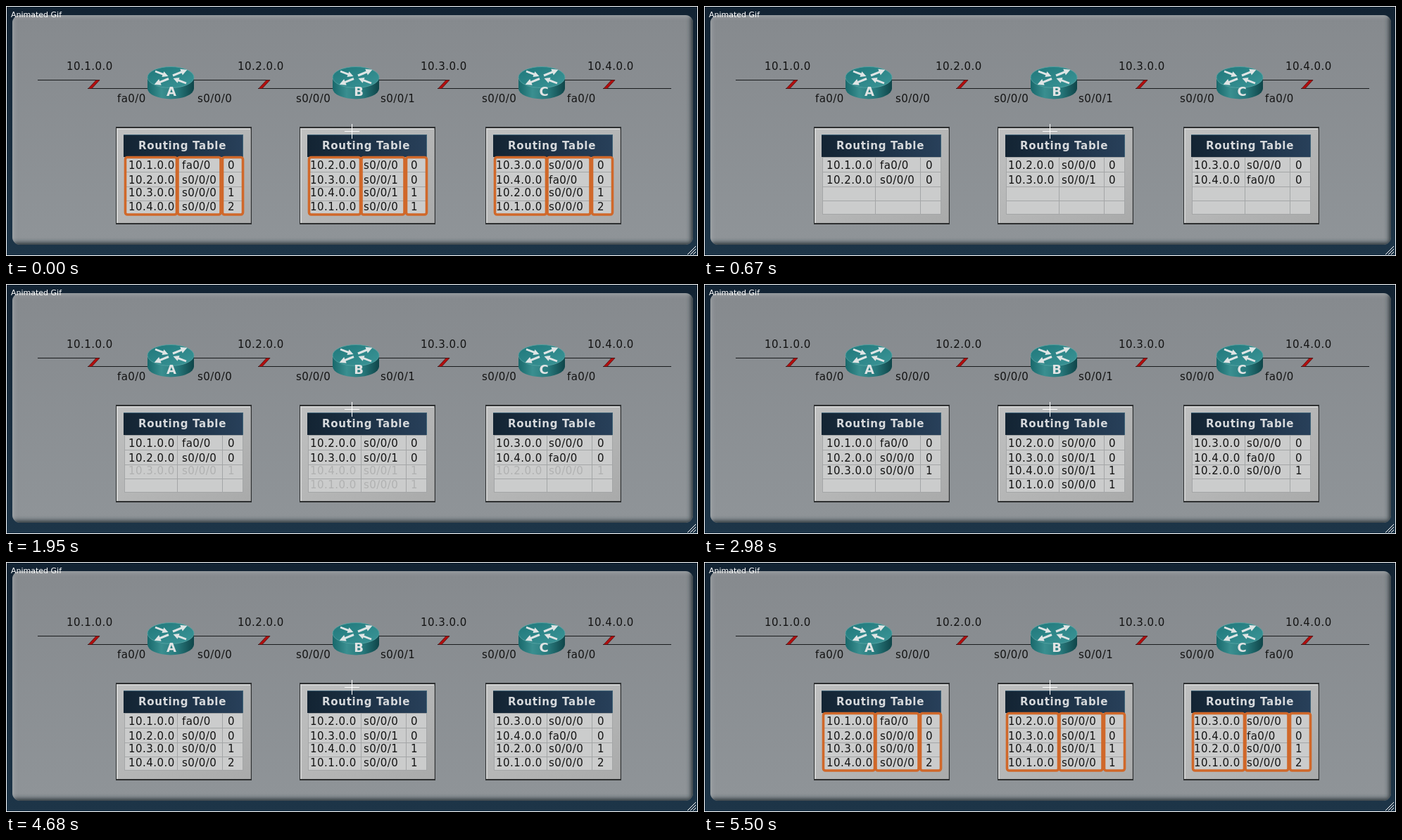
These frames come from a looping animation (983x356 px, 6320 ms). An HTML page:

```html
<!DOCTYPE html>
<html lang="en">
<head>
<meta charset="utf-8">
<title>Routing tables</title>
<style>
html, body { margin: 0; width: 100%; height: 100%; overflow: hidden; background: #fff; }
svg { display: block; }
text { font: 15px "DejaVu Sans", Verdana, sans-serif; letter-spacing: .45px; fill: #141414; white-space: pre; }
.title { font-weight: bold; letter-spacing: .7px; fill: #d6d9dc; }
.name { font-size: 18px; font-weight: bold; letter-spacing: 0; fill: #e2e4e4; text-anchor: middle; }
.caption { font-size: 11px; letter-spacing: 0; fill: #fff; }
.wire { stroke: #191b1d; fill: none; }
</style>
</head>
<body>
<svg id="stage" width="983" height="356" viewBox="0 0 983 356">
<defs>
  <linearGradient id="back" x2="0" y2="1"><stop stop-color="#122333"/><stop offset="1" stop-color="#1d3548"/></linearGradient>
  <linearGradient id="panel" x2="0" y2="1"><stop stop-color="#868a8e"/><stop offset="1" stop-color="#8f9498"/></linearGradient>
  <linearGradient id="frame" x2="1" y2="1"><stop stop-color="#bfc0c0"/><stop offset=".5" stop-color="#b5b6b6"/><stop offset="1" stop-color="#a9aaaa"/></linearGradient>
  <linearGradient id="head" x2="1"><stop stop-color="#132433"/><stop offset="1" stop-color="#28405a"/></linearGradient>
  <linearGradient id="side"><stop stop-color="#18686b"/><stop offset=".3" stop-color="#3a8f90"/><stop offset=".65" stop-color="#27787b"/><stop offset="1" stop-color="#0f4549"/></linearGradient>
  <linearGradient id="top" x2="1" y2="1"><stop stop-color="#1f777a"/><stop offset="1" stop-color="#3c9698"/></linearGradient>
  <filter id="soft"><feGaussianBlur stdDeviation="3"/></filter>
  <clipPath id="inside"><rect x="9" y="13" width="967" height="327" rx="11"/></clipPath>
  <g id="arrow"><path d="M0-1.6H13V-4.6L22 0 13 4.6V1.6H0Z" fill="#dfe5e5"/></g>
  <g id="router">
    <path d="M-33 0V16A33 15 0 0 0 33 16V0Z" fill="url(#side)"/>
    <ellipse rx="33" ry="15" fill="url(#top)" stroke="#5aa6a6" stroke-width=".8"/>
    <use href="#arrow" transform="translate(3 -2.5) rotate(-22)"/>
    <use href="#arrow" transform="translate(-3 2) rotate(158)"/>
    <use href="#arrow" transform="translate(-22 -8.5) rotate(21) scale(.9)"/>
    <use href="#arrow" transform="translate(22 8.5) rotate(201) scale(.9)"/>
  </g>
  <g id="table">
    <rect width="193" height="139" fill="#2d2f30"/>
    <rect x="1" y="2" width="190.5" height="135" fill="#d0d1d1"/>
    <rect x="3" y="4" width="188.5" height="133" fill="url(#frame)"/>
    <rect x="11" y="11" width="170" height="32" fill="url(#head)"/>
    <path d="M11 11.5H181M180.5 11V43" stroke="#3f6378" fill="none"/>
    <rect x="12" y="43" width="169" height="82" fill="#cbcccc"/>
    <path d="M12 43.5H181M12 64.5H181M12 85.5H181M12 105.5H181M12 124.5H181M87.5 43V125M151.5 43V125M180.5 43V125M12.5 43V125" stroke="#a4a6a7" fill="none"/>
    <text class="title" x="32" y="32">Routing Table</text>
  </g>
  <g id="marks" fill="none" stroke="#d0682a" stroke-width="3.6">
    <rect x="13.5" y="43.5" width="73" height="81.5" rx="3"/>
    <rect x="88" y="43.5" width="61" height="81.5" rx="3"/>
    <rect x="151.5" y="43.5" width="29" height="81.5" rx="3"/>
  </g>
</defs>
<rect x="1" y="1" width="981" height="354" fill="url(#back)"/>
<g clip-path="url(#inside)">
  <rect x="9" y="13" width="967" height="327" fill="url(#panel)"/>
  <path d="M978 10V342H6" fill="none" stroke="#2b343b" stroke-width="10" filter="url(#soft)"/>
  <path d="M8 342V12H978" fill="none" stroke="#a9adb0" stroke-width="4" filter="url(#soft)"/>
</g>
<g id="scene"></g>
<path d="M481 178.5H502M491.5 168V189M968 354 980 342M972 354 980 346M976 354 980 350" stroke="#fff" fill="none"/>
<text class="caption" x="7" y="16">Animated Gif</text>
</svg>
<script>
const LOOP = 6320;
const scene = document.getElementById("scene");

function add(tag, attrs, parent = scene, text = "") {
  const el = document.createElementNS("http://www.w3.org/2000/svg", tag);
  for (const key in attrs) el.setAttribute(key, attrs[key]);
  el.textContent = text;
  parent.appendChild(el);
  return el;
}
const write = (x, y, text, parent, cls = "") => add("text", { x, y, class: cls }, parent, text);

// Links: start of upper wire, left end of bolt, end of lower wire
[[45, 116, 203], [266, 358, 466], [529, 613, 730], [792, 848, 945]].forEach(([from, bolt, to]) => {
  add("path", { d: `M${from} 105.5H${bolt + 17}M${bolt} 117.5H${to}`, class: "wire" });
  add("path", { d: `M${bolt + 1} 117.5 ${bolt + 12} 105.5H${bolt + 17}L${bolt + 6} 117.5Z`,
    fill: "#b10e0e", stroke: "#4a1010", "stroke-width": .7 });
});
[[234, "A", 235], [497, "B", 501], [761, "C", 764]].forEach(([x, name, nameX]) => {
  add("use", { href: "#router", x, y: 101.5 });
  write(nameX, 128, name, scene, "name");
});
[86, 329, 589, 826].forEach((x, i) => write(x, 91, `10.${i + 1}.0.0`));
[[158, "fa0/0"], [272, "s0/0/0"], [412, "s0/0/0"], [532, "s0/0/1"], [676, "s0/0/0"], [797, "fa0/0"]]
  .forEach(([x, port]) => write(x, 137, port));

// Each entry: network, port, hops
const tables = [
  { x: 156, cols: [174, 250, 315], rows: ["1 fa0/0 0", "2 s0/0/0 0", "3 s0/0/0 1", "4 s0/0/0 2"] },
  { x: 417, cols: [432, 508, 575], rows: ["2 s0/0/0 0", "3 s0/0/1 0", "4 s0/0/1 1", "1 s0/0/0 1"] },
  { x: 681, cols: [696, 771, 840], rows: ["3 s0/0/0 0", "4 fa0/0 0", "2 s0/0/0 1", "1 s0/0/0 2"] }
];
const hop1 = [], hop2 = [], marks = [];
tables.forEach(({ x, cols, rows }) => {
  add("use", { href: "#table", x, y: 172 });
  rows.forEach((row, i) => {
    const [net, port, hops] = row.split(" ");
    const group = add("g", {});
    [`10.${net}.0.0`, port, hops].forEach((text, c) => write(cols[c], [232, 253, 271, 291][i], text, group));
    if (hops === "1") hop1.push(group);
    if (hops === "2") hop2.push(group);
  });
  marks.push(add("use", { href: "#marks", x, y: 172 }));
});

const fade = (list, opacity) => list.forEach(el => el.setAttribute("opacity", opacity));

function draw(now) {
  const t = now % LOOP;
  const full = t < 170;
  fade(hop1, full || t >= 2350 ? 1 : t >= 1950 ? .14 : 0);
  fade(hop2, full || t >= 4240 ? 1 : 0);
  fade(marks, full || t >= 5100 ? 1 : 0);
  requestAnimationFrame(draw);
}
draw(performance.now());
</script>
</body>
</html>
```
